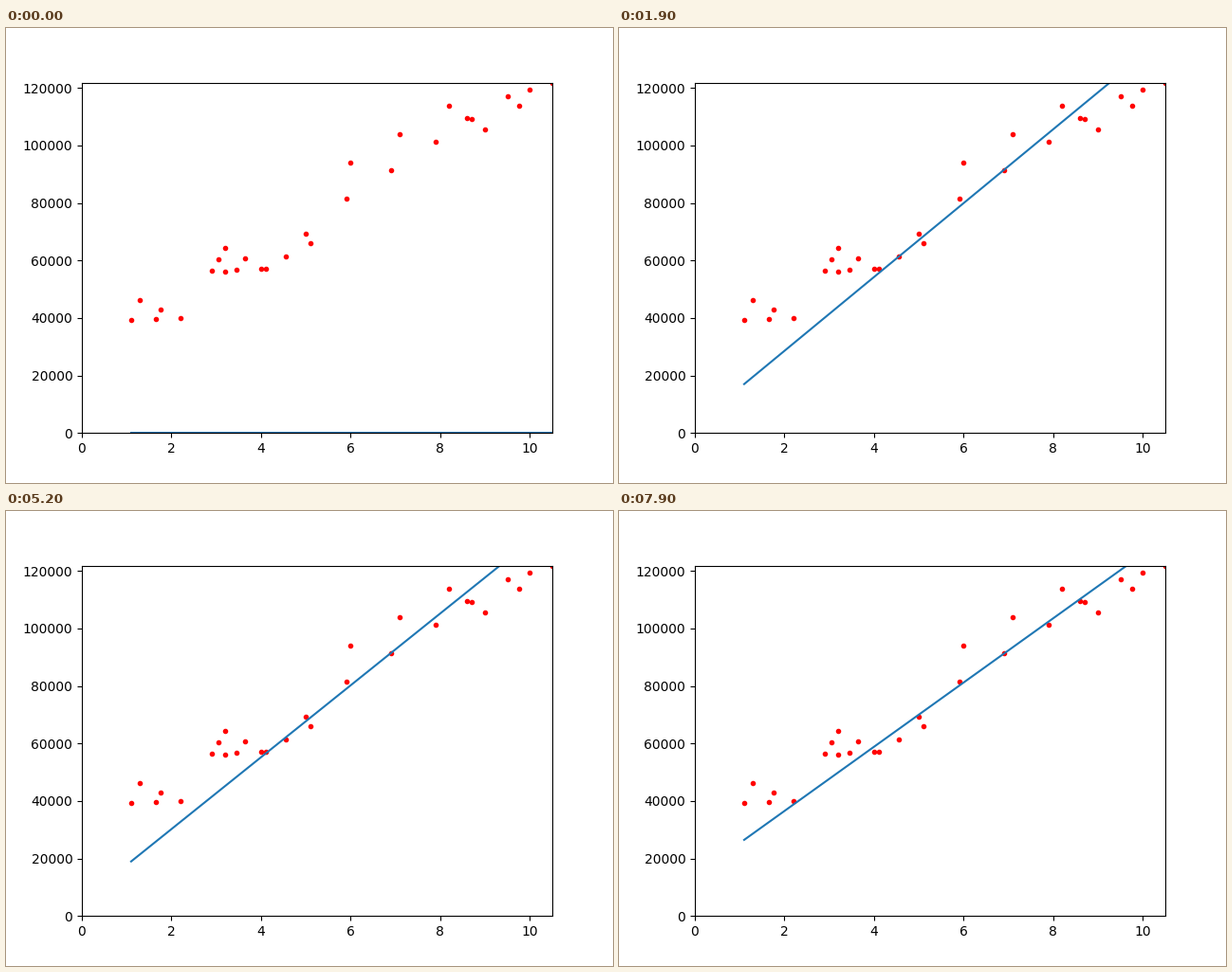
Write a matplotlib script that moves like this. It is 640x480 px and loops after 8000 ms.

```python
import numpy as np
import matplotlib.pyplot as plt
from matplotlib.animation import FuncAnimation

FRAMES, INTERVAL = 80, 100
RATE = 0.01
X_MAX, Y_MAX = 10.5, 121872

# Least-squares line and the moments of x that steer the descent
SLOPE, INTERCEPT = 9450, 25792
MEAN_X, MEAN_XX = 5.3133, 36.017

# Corners of a path, y in thousands; dots sit on the corners and halfway between
CORNERS = [(1.1, 39.3), (2.2, 39.9), (1.3, 46.2), (5.1, 66.0), (4.0, 57.0),
           (2.9, 56.6), (3.2, 64.4), (4.1, 57.1), (5.9, 81.4), (7.9, 101.3),
           (9.5, 117.0), (X_MAX, Y_MAX / 1000), (9.0, 105.6), (8.2, 113.8), (6.0, 93.9)]


def scatter_points():
    corners = np.array(CORNERS) * (1, 1000)
    halfway = (corners[:-1] + corners[1:]) / 2
    return np.concatenate([corners, halfway]).T


def descend(steps):
    """Slope and intercept after each gradient descent step, from zero."""
    w = b = 0.0
    path = [(w, b)]
    for _ in range(steps):
        dw, db = w - SLOPE, b - INTERCEPT
        w -= RATE * (MEAN_XX * dw + MEAN_X * db)
        b -= RATE * (MEAN_X * dw + db)
        path.append((w, b))
    return path


def step_at(i):
    """One step per frame at first, then ten."""
    return i if i < 50 else 50 + 10 * (i - 50)


path = descend(step_at(FRAMES - 1))
ends = np.array([1.1, X_MAX])

fig, ax = plt.subplots(figsize=(6.4, 4.8), dpi=100)
ax.set_xlim(0, X_MAX)
ax.set_ylim(0, Y_MAX)
ax.plot(*scatter_points(), "r.")
fit, = ax.plot(ends, 0 * ends, color="C0")


def update(i):
    w, b = path[step_at(i)]
    fit.set_ydata(w * ends + b)
    return fit,


anim = FuncAnimation(fig, update, frames=FRAMES, interval=INTERVAL,
                     repeat=True, repeat_delay=0, blit=False)
plt.show()
```
